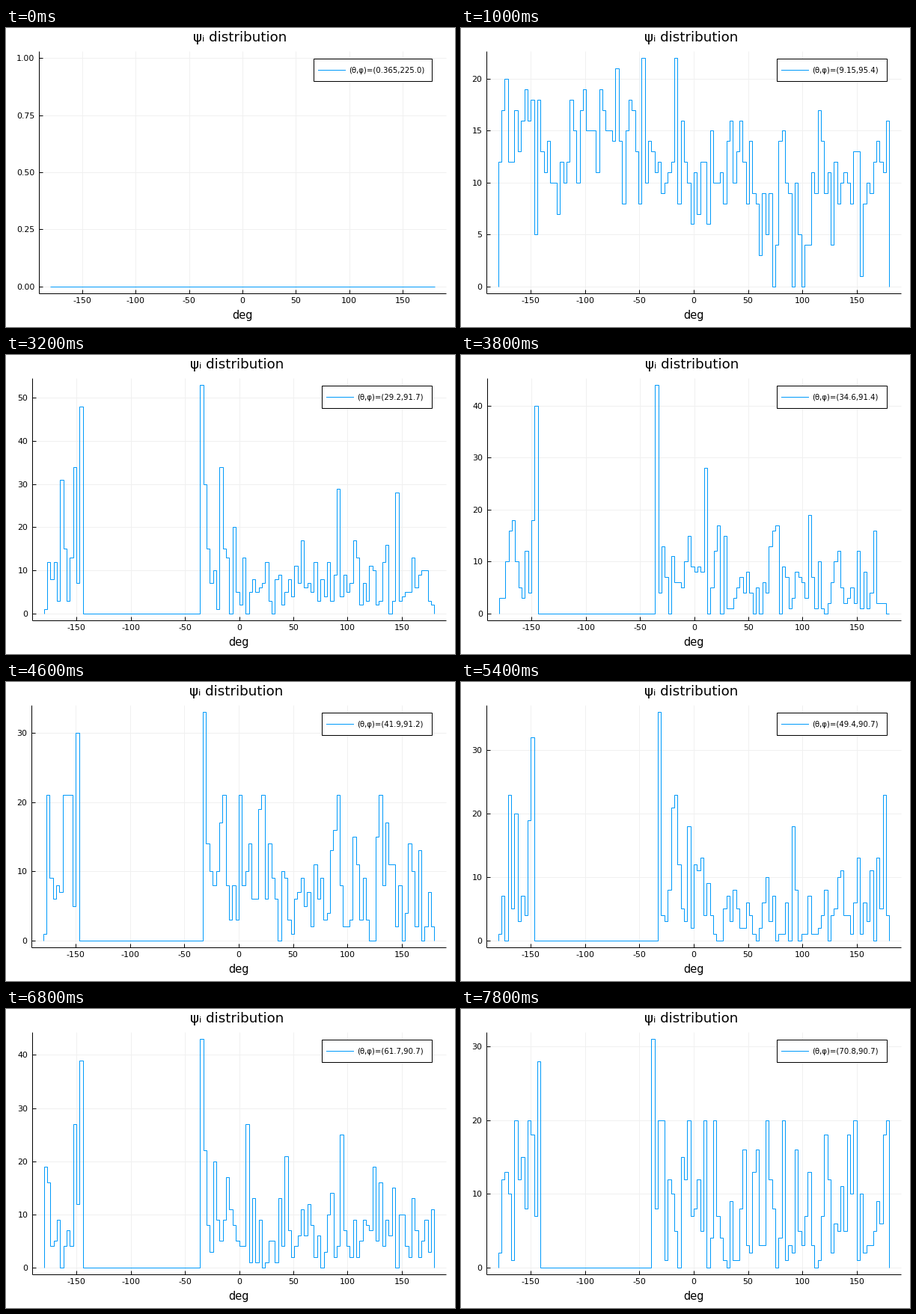
These frames come from a looping animation (600x400 px, 8 s). A matplotlib script:

```python
import numpy as np
import matplotlib.pyplot as plt
from matplotlib.animation import FuncAnimation
from matplotlib.patches import Rectangle

W, H, DPI = 600, 400, 100
FRAMES, STEP_MS = 40, 200
TOP, BOTTOM, RIGHT = 31, 355, 588
PAD = 0.03
BLUE, GRID = "#009afa", "#f0f0f0"
PX = 72 / DPI  # points per pixel

EDGES = np.linspace(-180, 180, 121)
MIDS = (EDGES[:-1] + EDGES[1:]) / 2

# Key moments of the run
STOPS = [0, 5, 16, 23, 27, 34, 39]
THETA = np.array([0.365, 9.15, 29.2, 41.9, 49.4, 61.7, 70.8])
PHI = np.array([225, 95.4, 91.7, 91.2, 90.7, 90.7, 90.7])
GAP_HALF = [0, 0, 54, 57, 57, 54, 51]
TALLEST = [16, 22, 53, 33, 36, 43, 31]

plt.rcParams["font.family"] = "DejaVu Sans"
fig = plt.figure(figsize=(W / DPI, H / DPI), dpi=DPI, facecolor="white")
ax = fig.add_axes([0, 0, 1, 1])


def angles(n):
    theta = np.interp(n, STOPS, THETA)
    phi = 90 + np.interp(n, STOPS, THETA * (PHI - 90)) / theta
    return float(f"{theta:.3g}"), float(f"{phi:.3g}")


def counts(n):
    """Bar heights: an even spread that splits into a gap with tall edges."""
    if n == 0:
        return np.zeros(len(MIDS), int)
    rng = np.random.default_rng(100 + n)
    top = round(np.interp(n, STOPS, TALLEST))
    half = 3 * round(np.interp(n, STOPS, GAP_HALF) / 3)

    if half == 0:
        level = 10 + 3 * np.cos(np.radians(MIDS + 90))
        bars = np.maximum(level + rng.normal(0, 3.2, len(MIDS)), 0)
        return np.rint(bars * top / bars.max()).astype(int)

    dist = np.maximum(np.abs(MIDS + 90) - half, 0)
    level = 7 + 9 * np.exp(-dist / 25)
    bars = rng.poisson(rng.gamma(1.5, level / 1.5))
    bars = np.minimum(bars, int(0.65 * top))
    lo, hi = (90 - half) // 3, (90 + half) // 3
    bars[lo:hi] = 0
    bars[lo - 1], bars[hi] = round(0.9 * top), top
    return bars


def line(xs, ys, color="black"):
    ax.plot(xs, ys, color=color, lw=PX, solid_capstyle="butt",
            solid_joinstyle="miter")


def text(x, y, s, size, ha="center"):
    ax.text(x, y, s, fontsize=size * PX, ha=ha, va="baseline",
            color="black", zorder=4)


def legend(n):
    theta, phi = angles(n)
    label = f"(θ,φ)=({theta},{phi})"
    left = 410.6 + 5.5 * (19 - len(label))
    ax.add_patch(Rectangle((left, 41), 569.4 - left, 30, fc="white",
                           ec="black", lw=PX, zorder=3))
    ax.plot([left + 6, left + 42], [56, 56], color=BLUE, lw=PX, zorder=4)
    text(left + 47.5, 60.5, label, 10.1, "left")


def draw(n):
    ax.clear()
    ax.set(xlim=(0, W), ylim=(H, 0))
    ax.axis("off")

    bars = counts(n)
    top = max(bars.max(), 1)
    step = 0.25 if top == 1 else 5 if top < 26 else 10
    left = 44 if top == 1 else 35 if top >= 40 else 34
    mid = (left + RIGHT) / 2
    sx = (RIGHT - left) / (360 * (1 + 2 * PAD))
    sy = (BOTTOM - TOP) / (top * (1 + 2 * PAD))
    zero = BOTTOM - PAD * top * sy

    xticks = [(mid + a * sx, str(a)) for a in range(-150, 151, 50)]
    yticks = [(zero - v * sy, f"{v:.2f}" if top == 1 else f"{v:.0f}")
              for v in np.arange(0, top + 0.01, step)]
    for x, _ in xticks:
        line([x, x], [TOP, BOTTOM], GRID)
    for y, _ in yticks:
        line([left, RIGHT], [y, y], GRID)

    line([left, left], [TOP, BOTTOM])
    line([left, RIGHT], [BOTTOM, BOTTOM])
    for x, s in xticks:
        line([x, x], [BOTTOM, BOTTOM - 5])
        text(x, 368.5, s, 11)
    for y, s in yticks:
        line([left, left + 5], [y, y])
        text(left - 5.5, y + 4, s, 11, "right")

    heights = np.concatenate([[0], np.repeat(bars, 2), [0]])
    line(mid + np.repeat(EDGES, 2) * sx, zero - heights * sy, BLUE)

    text(mid - 66, 18, "ψᵢ distribution", 18.3, "left")
    text(mid, 389, "deg", 14.6)
    legend(n)
    return []


anim = FuncAnimation(fig, draw, frames=FRAMES, interval=STEP_MS,
                     init_func=lambda: draw(0), repeat=True, repeat_delay=0)
plt.show()
```
